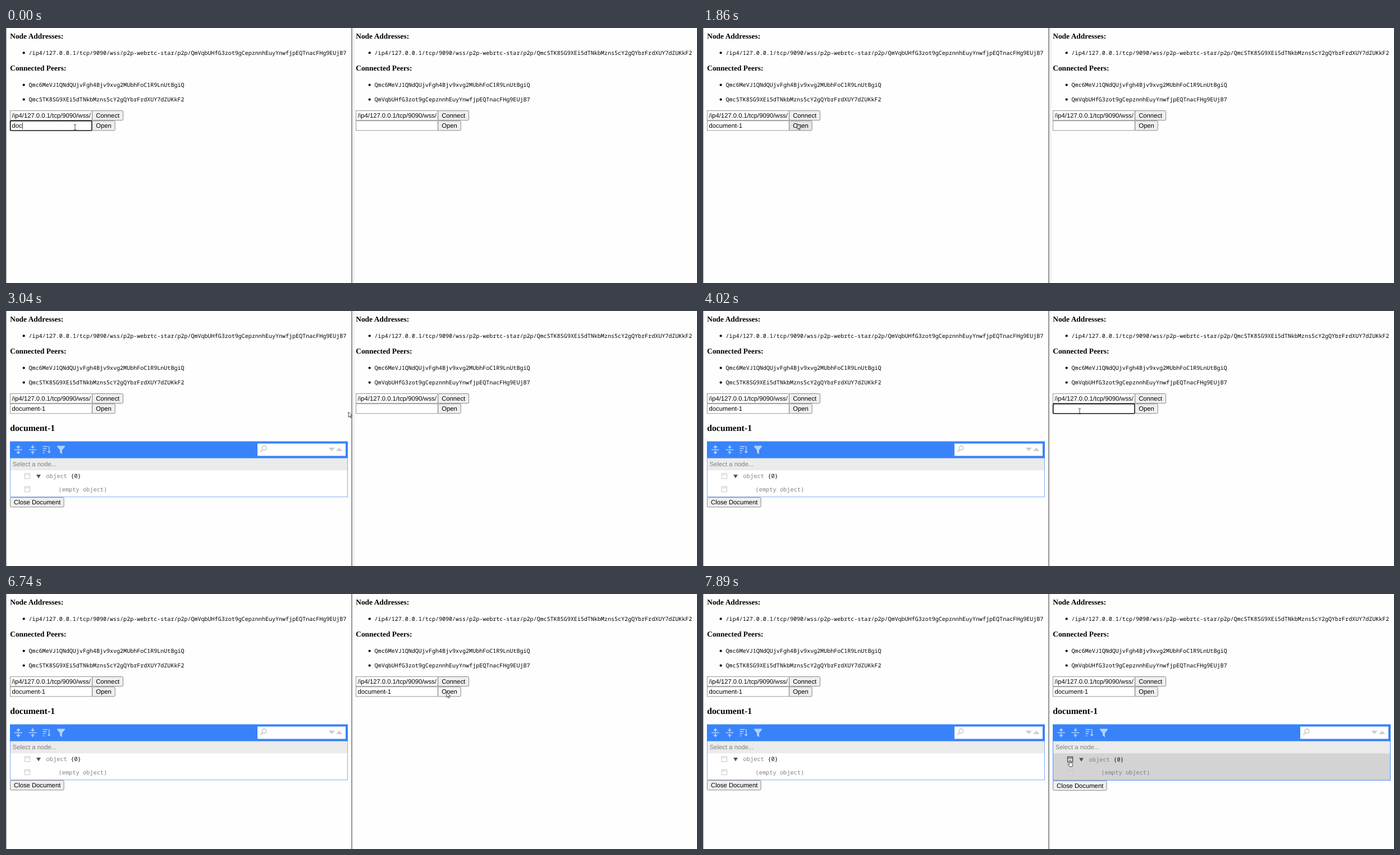
An HTML page that plays this animation: 1231 by 455 pixels, repeating every 8 s.

```html
<!DOCTYPE html>
<html lang="en">
<head>
<meta charset="utf-8">
<title>Shared document demo</title>
<style>
  html, body { margin: 0; width: 100%; height: 100%; overflow: hidden; background: #fefefe; }
  svg { display: block; width: 1231px; height: 455px; }
  text { text-rendering: geometricPrecision; white-space: pre; }
  .heading { font: bold 13.45px "Liberation Serif", serif; }
  .title { font: bold 15.8px "Liberation Serif", serif; }
  .mono { font: 10.04px "Noto Sans Mono", monospace; }
  .tree { font: 10.33px "Noto Sans Mono", monospace; }
  .ui { font: 11.27px "Liberation Sans", sans-serif; }
</style>
</head>
<body>
<svg id="stage" viewBox="0 0 1231 455"></svg>
<script>
const LOOP = 8000;
const RIGHT = 616;
const NAME = 'document-1';
const ADDRESS = '/ip4/127.0.0.1/tcp/9090/wss/';
const PEERS = {
  shared: 'Qmc6MeVJ1QNdQUjvFgh4Bjv9xvg2MUbhFoC1R9LnUtBgiQ',
  left: 'QmVqbUHfG3zot9gCepznnhEuyYnwfjpEQTnacFHg9EUjB7',
  right: 'QmcSTK8SG9XEi5dTNkbMzns5cY2gQYbrFrdXUY7dZUKkF2'
};

// Each track holds [start time, ...values]; a value stays until the next entry.
const leftTyping = [[0, 3], [120, 4], [260, 5], [400, 7], [530, 8], [670, 9], [810, 10]];
const rightTyping = [[0, 0], [4140, 1], [4290, 3], [4440, 4], [5140, 6], [5320, 8], [5490, 10]];
const rightCaret = [[0, 0], [3320, 1], [4020, 0], [4140, 1], [4970, 0], [5140, 1], [6050, 0]];
const pointer = [
  [0, 'beam', 123, 177], [1460, 'beam', 137, 177], [1640, 'arrow', 168, 171],
  [2290, 'arrow', 180, 172], [2420, 'arrow', 225, 175], [2550, 'arrow', 310, 179],
  [2680, 'arrow', 420, 182], [2810, 'arrow', 530, 182], [2930, 'arrow', 610, 180],
  [3060, 'beam', 652, 179], [3190, 'beam', 671, 179],
  [6050, 'beam', 690, 179], [6190, 'arrow', 735, 188], [6330, 'arrow', 775, 180],
  [6470, 'arrow', 785, 175],
  [7320, 'arrow', 768, 215], [7455, 'arrow', 720, 285], [7590, 'arrow', 690.5, 322.5],
  [7740, 'arrow', 668, 308], [7890, 'hand', 654, 297.5]
];
const at = (track, time) => track.findLast(entry => entry[0] <= time).slice(1);

const text = (cls, x, y, content, fill = '#000') =>
  `<text class="${cls}" x="${x}" y="${y}" fill="${fill}">${content}</text>`;
const rect = (x, y, w, h, fill, extra = '') =>
  `<rect x="${x}" y="${y}" width="${w}" height="${h}" fill="${fill}" ${extra}/>`;
const path = (d, fill, extra = '') => `<path d="${d}" fill="${fill}" ${extra}/>`;
const group = (x, y, content) => `<g transform="translate(${x} ${y})">${content}</g>`;

const button = (x, y, w, label, fill = '#efefef') =>
  rect(x, y, w, 17.2, fill, 'stroke="#767676" stroke-width=".85" rx="1.7"') +
  text('ui', x + 6.5, y + 12.4, label);

function field(y, value, focused) {
  const box = focused
    ? rect(7.7, y - .1, 145.2, 17.4, '#fff', 'stroke="#101010" stroke-width="1.7" rx="1.2"')
    : rect(7.5, y, 145.8, 17.2, '#fff', 'stroke="#858585" stroke-width=".85"');
  return box + text('ui', 10.6, y + 12.4, value);
}

const bullet = (y, content) =>
  `<circle cx="31.7" cy="${y - 3.2}" r="2.1"/>` + text('mono', 40.6, y, content);

const menuIcons = (() => {
  const up = 'M0-8 4-4H1V-1.8H-1V-4H-4Z';
  const down = 'M0 8 4 4H1V1.8H-1V4H-4Z';
  const bar = 'M-7-.8H7V.8H-7Z';
  const inward = 'M0-2 4-5H1V-8H-1V-5H-4ZM0 2 4 5H1V8H-1V5H-4Z';
  const sort = 'M-7-6.5H2V-5H-7ZM-7-2.7H0V-1.2H-7ZM-7 1.1H-2V2.6H-7ZM-7 4.9H-4V6.4H-7Z' +
    'M3.5-6.5H5V3H7.5L4.2 6.6 1 3H3.5Z';
  const funnel = 'M-7-7H7V-5.5L2 .5V8L-2 5V.5L-7-5.5Z';
  return [[22, up + down + bar], [47.5, inward + bar], [72.5, sort], [98, funnel]]
    .map(([x, d]) => group(x, 247.5, path(d, '#b3d0fe'))).join('');
})();

const rowIcon = (y, color) => group(38, y,
  rect(-4.6, -4.6, 9.2, 9.2, 'none', `stroke="${color}" stroke-width="1.2"`) +
  path('M-4.6-2.4H4.6', 'none', `stroke="${color}" stroke-width="1"`));

function editor(shift, border, highlighted) {
  const rows = rowIcon(294.5, highlighted ? '#444' : '#cfcfcf') + rowIcon(318, '#cfcfcf') +
    path('M54 292H62L58 298.5Z', '#555') +
    text('tree', 71.6, 298, 'object', '#808080') +
    text('tree', 115.2, 298, '{0}', '#1a1a1a') +
    text('tree', 93.5, 321.5, '(empty object)', '#808080');
  return text('title', 7.2, 213.5, NAME) +
    rect(8, 284, 600, 48 + shift, highlighted ? '#d3d3d3' : '#fff') +
    rect(8, 263, 600, 21.3, '#ebebeb') +
    text('ui', 11.8, 277.3, 'Select a node...', '#808080') +
    group(0, shift, rows) +
    rect(7.5, 233.2, 601, 98.5 + shift, 'none', `stroke="${border}" stroke-width="1"`) +
    rect(7, 232.7, 602, 30, '#3883fa') + menuIcons +
    rect(448, 236.5, 157, 22, '#fff') +
    `<circle cx="460" cy="244.5" r="3.8" fill="none" stroke="#ccc" stroke-width="1.7"/>` +
    path('M457 247.5 453.4 251.4', 'none', 'stroke="#ccc" stroke-width="2.2"') +
    path('M574.5 243.8H586L580.2 250ZM588 250H599.5L593.8 243.8Z', '#cdcdcd') +
    button(7.5, 332.6 + shift, 95.6, 'Close Document');
}

function pane(own, other, state) {
  const caretX = 10.9 + state.typedWidth;
  return text('heading', 7.2, 18.6, 'Node Addresses:') +
    bullet(47.5, `${ADDRESS}p2p-webrtc-star/p2p/${own}`) +
    text('heading', 7.2, 76, 'Connected Peers:') +
    bullet(104.8, PEERS.shared) + bullet(130.8, other) +
    field(147.5, ADDRESS) + button(153.7, 147.5, 54.8, 'Connect') +
    field(165.7, state.value, state.focused) +
    button(153.7, 165.7, 40.5, 'Open', state.openFill) +
    (state.caret ? rect(caretX, 168.5, .9, 12, '#222') : '') +
    (state.open ? editor(state.shift, state.border, state.highlighted) : '');
}

const cursors = {
  beam: path('M-2.2-4.7H-.6L0-4.2.6-4.7H2.2M0-4.2V4.2M-2.2 4.7H-.6L0 4.2.6 4.7H2.2', 'none',
    'stroke="#333" stroke-width=".9"'),
  arrow: path('M0 0V9.4L2.1 7.5 3.5 10.7 5 10 3.6 7H6.6Z', '#fff', 'stroke="#222" stroke-width=".8"'),
  hand: path('M-1 0Q0-1 1 0V3.5L4.3 4.4Q5 5 4.6 7L3.8 10.5H-1.2L-3.6 6.6Q-3.6 5-2.2 5.6L-1 6.7Z',
    '#fff', 'stroke="#222" stroke-width=".8"')
};

const measure = document.createElement('canvas').getContext('2d');
measure.font = '112.7px "Liberation Sans", sans-serif';
const typed = count => {
  const value = NAME.slice(0, count);
  return { value, typedWidth: measure.measureText(value).width / 10 };
};

function scene(time) {
  const [kind, x, y] = at(pointer, time);
  const between = (from, to) => time >= from && time < to;
  const left = pane(PEERS.left, PEERS.right, {
    ...typed(at(leftTyping, time)[0]),
    focused: time < 1830,
    caret: time < 1310,
    openFill: between(1640, 2420) ? '#e5e5e5' : undefined,
    open: time >= 2010, shift: 0, border: '#7fadf5'
  });
  const right = pane(PEERS.right, PEERS.left, {
    ...typed(at(rightTyping, time)[0]),
    focused: between(3320, 6740),
    caret: at(rightCaret, time)[0],
    openFill: between(6330, 6740) ? '#e5e5e5' : between(6740, 7320) ? '#f5f5f5' : undefined,
    open: time >= 6860, shift: .6, border: '#4a8ffa', highlighted: time >= 7890
  });
  const divider = time < 3320
    ? rect(615, 0, 2, 455, '#969696') + rect(617, 0, 4, 455, '#f1f1f1')
    : rect(615.3, 0, 1.5, 455, '#707070');
  return rect(0, 0, 1231, 455, '#fefefe') + rect(0, 0, 1, 455, '#9a9a9a') + divider +
    left + group(RIGHT, 0, right) + group(x, y, cursors[kind]);
}

const stage = document.getElementById('stage');
const start = performance.now();
let shown = '';

function draw() {
  const markup = scene((performance.now() - start) % LOOP);
  if (markup !== shown) stage.innerHTML = shown = markup;
  requestAnimationFrame(draw);
}
draw();
</script>
</body>
</html>
```
